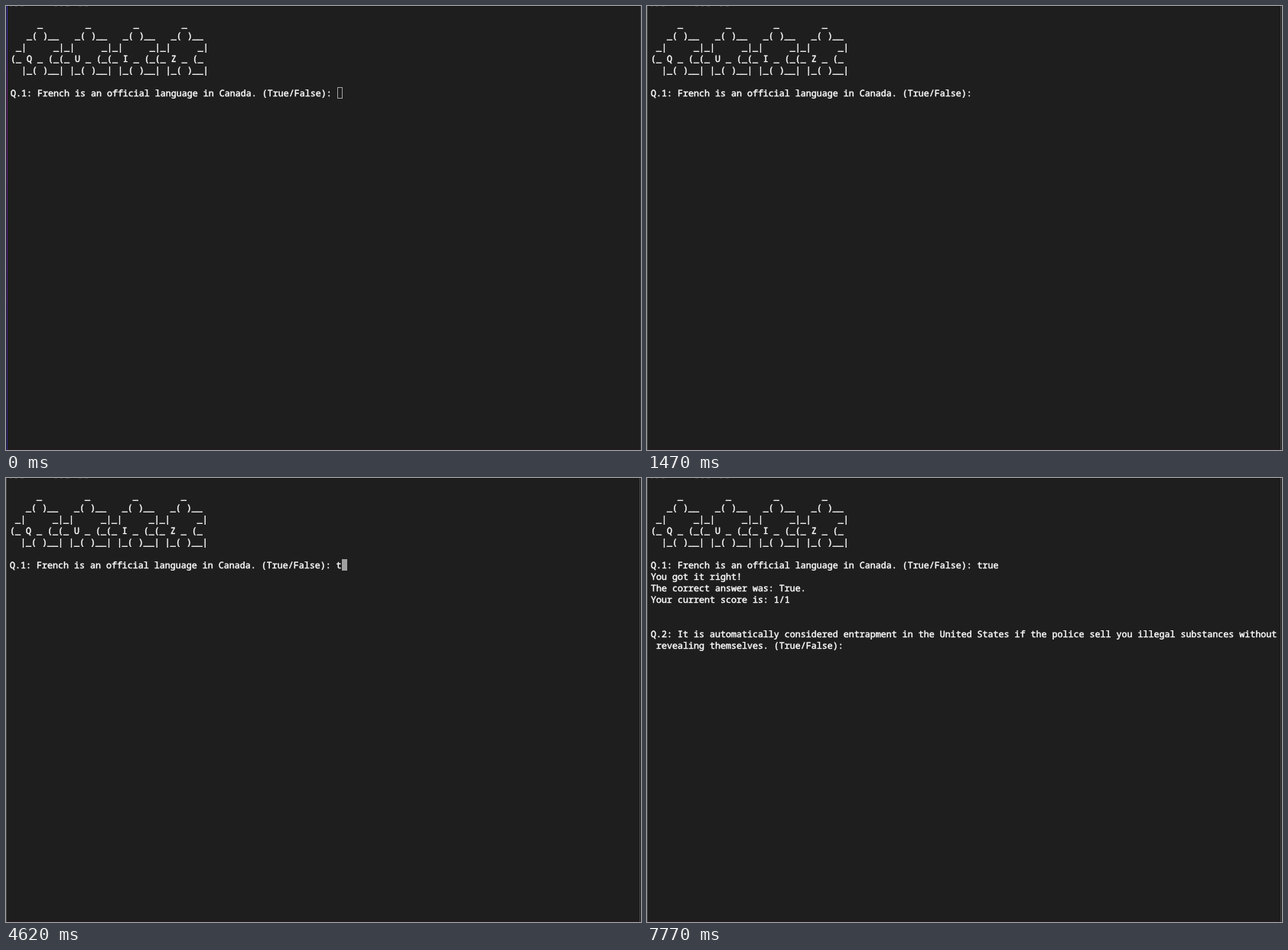
Recreate the animation shown at these times as an HTML page. Size 830 by 580 pixels, loop 8000 ms.

```html
<!DOCTYPE html>
<html lang="en">
<head>
<meta charset="utf-8">
<title>Terminal quiz</title>
<style>
  html, body { margin: 0; width: 100%; height: 100%; overflow: hidden; background: #1e1e1e; }
  svg { display: block; width: 830px; height: 580px; }
  text {
    font: 500 11.6667px "Noto Sans Mono", "DejaVu Sans Mono", monospace;
    fill: #fff;
    stroke: #fff;
    stroke-width: .45px;
    white-space: pre;
    text-rendering: geometricPrecision;
    font-variant-ligatures: none;
  }
</style>
</head>
<body>
<svg viewBox="0 0 830 580">
  <defs>
    <linearGradient id="glow" x1="0" y1="0" x2="0" y2="1">
      <stop offset="0" stop-color="#3430b0"/>
      <stop offset=".12" stop-color="#4a2a9c"/>
      <stop offset=".2" stop-color="#702080"/>
      <stop offset=".5" stop-color="#56208c"/>
      <stop offset="1" stop-color="#33288c"/>
    </linearGradient>
  </defs>
  <rect width="830" height="580" fill="#1e1e1e"/>
  <rect width="830" height="1" fill="#161616"/>
  <path d="M5 .5h3m3 0h4m4 0h4M63 .5h4m4 0h3m4 0h5m12 0h4m4 0h4" stroke="#333"/>
  <rect y="579" width="830" height="1" fill="#241a1f"/>
  <rect id="left" width="1" height="580"/>
  <rect id="right" width="1" height="580"/>
  <g id="screen">
    <g id="lines"></g>
    <rect id="cursor"/>
  </g>
</svg>
<script>
const LOOP = 8000, CELL = 7, ROW = 15, LEFT = 5, BASE = 28;
const SHIFT = 840, FOCUS = 980, DONE = 6510;
const KEYS = [4620, 5320, 5600, 5880];
const BLINKS = [1470, 2030, 2520, 3080, 3570, 4130, 7770];

const letters = [..."QUIZ"];
const prompt = "Q.1: French is an official language in Canada. (True/False): ";
const banner = [
  "     _   ".repeat(4),
  "   _( )__".repeat(4),
  " _|" + "     _|_|".repeat(3) + "     _|",
  letters.map(c => `(_ ${c} _ (_`).join(""),
  "  |_( )__|" + " |_( )__|".repeat(3),
  ""
];
const reply = [
  "You got it right!",
  "The correct answer was: True.",
  "Your current score is: 1/1",
  "",
  "",
  "Q.2: It is automatically considered entrapment in the United States if the police sell you illegal substances without",
  " revealing themselves. (True/False): "
];

const el = id => document.getElementById(id);
const set = (node, attrs) => {
  for (const k in attrs) node.setAttribute(k, attrs[k]);
};
const rows = Array.from({ length: banner.length + 1 + reply.length }, (_, i) => {
  const t = document.createElementNS("http://www.w3.org/2000/svg", "text");
  set(t, { x: LEFT, y: BASE + i * ROW });
  return el("lines").appendChild(t);
});

const passed = (times, t) => times.filter(at => t >= at).length;

function render(t) {
  const early = t < SHIFT, focused = t >= FOCUS;
  const typed = "true".slice(0, passed(KEYS, t));
  const text = [...banner, prompt + typed, ...(t >= DONE ? reply : [])];
  rows.forEach((row, i) => {
    const line = text[i] || "";
    if (row.textContent !== line) row.textContent = line;
  });

  const last = text.length - 1;
  const x = LEFT + text[last].length * CELL, y = BASE + last * ROW - 12;
  const shown = passed(BLINKS, t) % 2 === 0;
  // The cursor is hollow until the window has focus.
  set(el("cursor"), focused
    ? { x, y, width: CELL, height: ROW, fill: "#a0a0a0", stroke: "none" }
    : { x: x + .5, y: y + .5, width: CELL - 1, height: ROW - 1, fill: "none", stroke: "#a0a0a0" });
  set(el("cursor"), { visibility: shown ? "visible" : "hidden" });

  set(el("screen"), { transform: `translate(${early ? 1 : 0} 0)` });
  set(el("left"), { x: early ? 1 : 0, fill: early ? "url(#glow)" : "#484848" });
  set(el("right"), { x: early ? 829 : 828, fill: early ? "#303038" : "#484848" });
}

function tick() {
  render(performance.now() % LOOP);
  requestAnimationFrame(tick);
}
tick();
</script>
</body>
</html>
```
